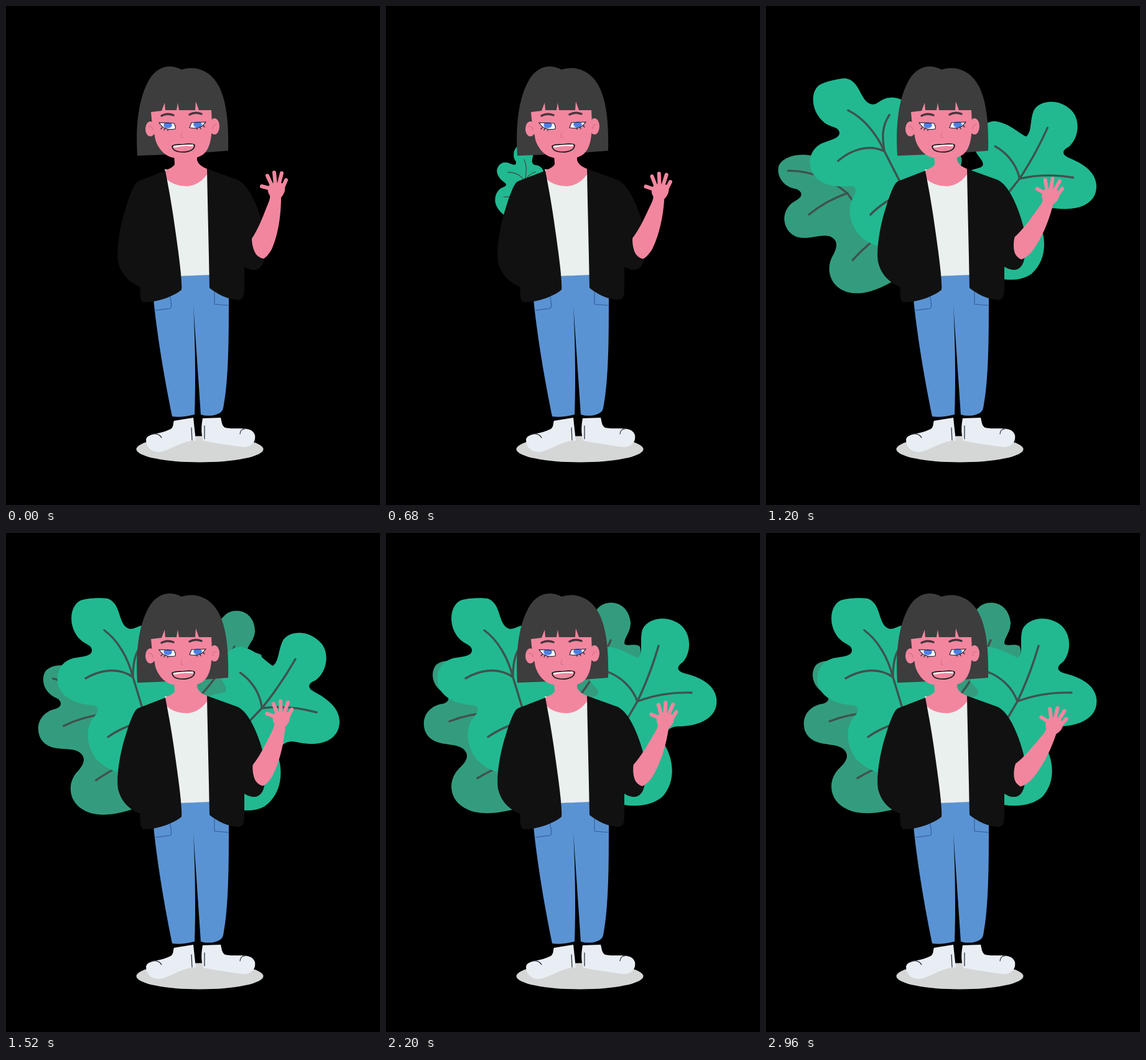
These frames come from a looping animation (601x800 px, 3 s). An HTML page:

```html
<!DOCTYPE html>
<html lang="en">
<head>
<meta charset="utf-8">
<title>Waving girl</title>
<style>
  html, body { margin: 0; width: 100%; height: 100%; overflow: hidden; background: #000; }
  svg { display: block; width: 601px; height: 800px; }
  .front { fill: #22b991; }
  .back { fill: #349c7e; }
  .vein { fill: none; stroke: #3f524e; stroke-width: 3.4; stroke-linecap: round; stroke-linejoin: round; }
  .skin { fill: #f3869f; }
  .finger { fill: none; stroke: #f3869f; stroke-width: 6; stroke-linecap: round; }
  .hair { fill: #3d3d3d; }
  .jacket { fill: #111; }
  .shoe { fill: #e9eef4; }
  .line { fill: none; stroke: #1b2330; stroke-width: 1.2; stroke-linecap: round; }
  .brow { fill: none; stroke: #45383e; stroke-width: 3.4; stroke-linecap: round; }
  .soft { fill: none; stroke: #d56f88; stroke-width: 1.2; stroke-linecap: round; }
</style>
</head>
<body>
<svg viewBox="0 0 601 800">
  <g id="backLeft">
    <path class="back" d="M215,440C190,448 150,456 125,440C100,425 100,395 117,378C130,366 135,356 124,346C108,334 75,345 63,318C55,295 70,277 90,274C101,272 104,264 95,257C75,248 70,225 80,212C95,198 130,205 150,225C170,245 185,270 200,300L235,400Z"/>
    <path class="vein" d="M91,225Q140,240 171,288L200,380M102,302Q135,289 171,288M147,393Q165,382 190,372"/>
  </g>
  <g id="backRight">
    <path class="back" d="M305,268C330,268 360,262 385,235C405,215 412,195 408,182C400,176 385,183 383,177C384,165 393,160 393,143C390,118 372,110 358,112C345,113 338,122 330,135C300,150 290,200 295,235Z"/>
    <path class="vein" d="M310,262Q338,228 361,172"/>
  </g>
  <g id="frontLeft">
    <path class="front" d="M240,390C200,392 165,385 145,362C128,340 127,310 143,293C152,283 147,276 138,276C115,274 92,266 84,245C78,220 92,203 112,200C125,198 139,197 138,187C136,176 122,180 111,160C100,140 105,115 120,108C135,103 158,104 163,105C184,112 180,140 193,151C203,158 208,150 220,148C255,145 265,180 255,205C290,205 310,250 285,275C270,290 290,330 280,360C270,385 255,390 240,390Z"/>
    <path class="vein" d="M158,156C180,172 196,200 204,231L228,310M128,233C150,220 180,214 204,231C204,205 208,190 222,175M164,327Q186,311 225,300"/>
  </g>
  <g id="frontRight">
    <path class="front" d="M340,420C370,440 420,445 445,422C468,395 460,360 448,340C443,325 452,310 470,310C505,310 535,295 531,265C527,240 500,230 480,225C465,221 468,213 477,207C492,190 490,160 473,147C450,130 420,137 412,155C407,172 414,192 405,200C392,196 375,182 350,182C322,188 318,222 328,238C335,246 342,250 341,257C338,264 325,262 315,275L320,400Z"/>
    <path class="vein" d="M438,181C428,215 416,245 404,270L366,335M491,256C455,255 425,262 404,270C395,245 375,230 357,223"/>
  </g>

  <ellipse cx="311.5" cy="710.5" rx="102" ry="21" fill="#d5d7d7"/>
  <path class="shoe" d="M270,665L301,660L305,697C290,695 270,708 252,714C235,718 225,708 225,695C228,684 245,688 265,678C270,674 268,669 270,665Z"/>
  <path class="shoe" d="M316,661L345,660C347,668 347,673 352,676C370,680 395,672 400,688C402,700 393,708 380,707C355,704 335,700 317,697C313,685 314,672 316,661Z"/>
  <path class="line" d="M298,676L299,696M319,673V694M234,686Q245,684 250,692M376,686Q377,678 384,678"/>

  <path fill="#5a93d3" d="M237,470L281,433L327,430L358,465C358,530 358,600 349,645C346,657 325,659 313,655L301,480C304,540 305,600 303,655C290,658 278,660 267,658C255,600 243,530 237,470Z"/>
  <path class="line" style="stroke:#355f9b" d="M240,488L263,485Q267,484 265,474L263,462M335,455V478L357,480"/>
  <path fill="#eaf0ee" d="M255,262H325L328,431L281,433Z"/>

  <path class="hair" d="M211,240C208,190 213,145 232,115C248,92 270,95 282,102C300,96 325,100 340,125C355,150 358,190 357,232L318,235L260,238Z"/>
  <path class="skin" d="M270,238H307V246Q308,255 323,261V270Q310,288 290,289Q268,288 258,277L255,264Q271,258 271,253Z"/>
  <path class="jacket" d="M256,264L212,281C206,284 200,300 193,322C183,352 177,390 180,410C185,432 200,444 215,450C216,460 215,475 222,475C245,475 270,465 282,455C284,440 275,380 270,345C265,310 260,285 256,264Z"/>
  <path class="jacket" d="M323,261L373,279C390,288 405,320 414,355L416,400C414,418 406,424 396,423Q389,422 383,418L383,450C383,465 382,471 372,471C355,470 340,462 327,452C326,390 324,320 323,261Z"/>

  <g id="arm">
    <path class="skin" d="M395,373C405,358 412,340 419,322C422,315 425,308 424,304C419,297 420,289 426,284H444C451,288 449,300 442,307C442,340 436,370 427,390Q420,402 414,405Q403,403 399,393Q395,383 395,373Z"/>
    <path class="finger" d="M426,293L411,289M427,287L420,272M433,287L431,267M438,288L443,268M444,293L450,279"/>
  </g>

  <ellipse class="skin" cx="232" cy="197" rx="8" ry="12"/>
  <ellipse class="skin" cx="335" cy="193" rx="8" ry="13"/>
  <path class="skin" d="M233,170L250,168 255,155 256,167 274,167 276,155 278,167 304,167 305,153 310,167 330,167C332,200 331,225 318,237C305,247 285,248 268,243C252,240 240,222 239,208C235,195 234,180 233,170Z"/>
  <path class="soft" d="M229,193Q235,192 236,199M338,190Q332,190 332,197M283,203Q280,208 282,211L285,211"/>
  <path class="brow" d="M250,176Q259,171 269,175M295,174Q304,169 314,173"/>
  <path fill="#fff" d="M246,187L270,188Q273,193 272,197Q254,201 246,187ZM321,186L298,187L295,195Q313,199 321,186Z"/>
  <ellipse cx="260" cy="191" rx="6.8" ry="4.8" fill="#4d7fe8"/>
  <ellipse cx="308" cy="190" rx="6.8" ry="4.8" fill="#4d7fe8"/>
  <path class="line" d="M246,187L270,188Q273,193 272,197Q254,201 246,187ZM321,186L298,187L295,195Q313,199 321,186ZM251,195l-2,2M255,197l-1,2M260,198v2M307,196v2M312,195l1,2M317,192l2,2"/>
  <path class="skin" stroke="#1c1c1c" stroke-width="1.8" d="M267,225Q269,222 285,222Q299,220 303,223Q303,232 288,234Q268,235 267,225Z"/>
  <path fill="#fff" d="M269,224Q285,222 301,222L300,225Q285,223 270,227Z"/>
</svg>
<script>
const LOOP = 3000, STEP = 40, HOLD = 160;

// Times count in steps: each leaf grows until `grown`, swings from `from` to `peak`, then rests.
const leaves = [
  { id: 'backLeft', x: 190, y: 425, from: 60, peak: -18, start: 17, grown: 22.5, swung: 28, rest: 37 },
  { id: 'backRight', x: 305, y: 265, from: -50, peak: 6, start: 25, grown: 39, swung: 36, rest: 48 },
  { id: 'frontLeft', x: 208, y: 309, from: 42, peak: -10.3, start: 11.7, grown: 20, swung: 28.5, rest: 34 },
  { id: 'frontRight', x: 362, y: 306, from: -50, peak: 13.5, start: 16, grown: 30, swung: 34, rest: 44 },
];

const progress = (k, a, b) => Math.min(1, Math.max(0, (k - a) / (b - a)));
const easeOut = p => 1 - (1 - p) ** 3;
const easeInOut = p => (1 - Math.cos(Math.PI * p)) / 2;

function pose(id, x, y, angle, scale = 1) {
  document.getElementById(id).setAttribute('transform',
    `translate(${x} ${y}) rotate(${angle}) scale(${scale}) translate(${-x} ${-y})`);
}

function draw(now) {
  const k = Math.max(0, Math.floor((now % LOOP - HOLD) / STEP));
  for (const { id, x, y, from, peak, start, grown, swung, rest } of leaves) {
    const swing = from + (peak - from) * easeOut(progress(k, start, swung));
    const angle = swing * (1 - easeInOut(progress(k, swung, rest)));
    pose(id, x, y, angle, easeOut(progress(k, start, grown)));
  }
  const phase = (22.6 * k + 13) * Math.PI / 180;
  pose('arm', 407, 390, 9.7 * (Math.cos(13 * Math.PI / 180) - Math.cos(phase)));
  requestAnimationFrame(draw);
}
draw(performance.now());
</script>
</body>
</html>
```
